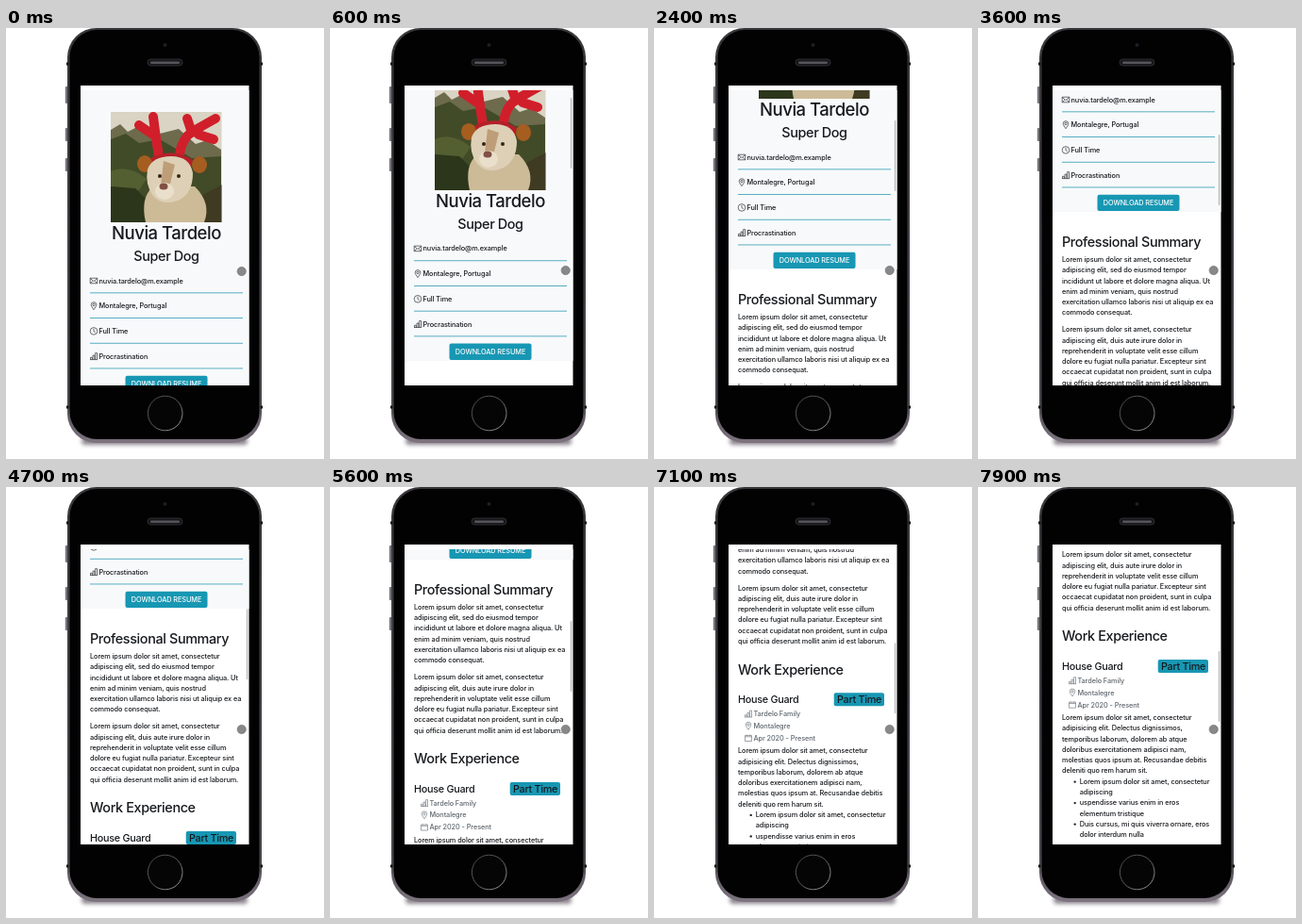
Recreate the animation shown at these times as an HTML page. Size 337 px wide and 457 px high, loop 8000 ms.

```html
<!DOCTYPE html>
<html lang="en">
<head>
<meta charset="utf-8">
<title>Resume on a phone</title>
<style>
  html, body { margin: 0; width: 100%; height: 100%; overflow: hidden; background: #fff; }
  svg { display: block; }
  text { font-family: Inter, sans-serif; font-size: 7.3px; font-weight: 450; letter-spacing: -.01em; fill: #16191d; }
  .h1, .h2, .h3 { font-weight: 530; letter-spacing: -.026em; }
  .h1 { font-size: 18.5px; }
  .h2 { font-size: 14.4px; }
  .h3 { font-size: 10.8px; }
  .muted { fill: #5f676f; font-weight: 500; }
  .mid { text-anchor: middle; }
  .light { fill: #fff; }
  .icon { fill: none; stroke: #212529; stroke-width: .65; }
  .icon.muted { stroke: #6c757d; }
</style>
</head>
<body>
<svg width="337" height="457" viewBox="0 0 337 457">
  <defs>
    <linearGradient id="rim" x2="0" y2="1">
      <stop offset="0" stop-color="#39363b"/>
      <stop offset=".9" stop-color="#4d484f"/>
      <stop offset="1" stop-color="#7d7480"/>
    </linearGradient>
    <linearGradient id="ring" x2="1" y2="1">
      <stop offset="0" stop-color="#4a4a4a"/>
      <stop offset=".5" stop-color="#5a5a5a"/>
      <stop offset="1" stop-color="#a5a5a5"/>
    </linearGradient>
    <filter id="soft" x="-10%" y="-100%" width="120%" height="300%"><feGaussianBlur stdDeviation="2"/></filter>
    <clipPath id="view"><rect x="79" y="66" width="178.500" height="313"/></clipPath>
    <clipPath id="photo"><rect x="111" y="89" width="117.500" height="117"/></clipPath>
  </defs>

  <!-- phone -->
  <rect x="80" y="434" width="176" height="8" rx="4" fill="#8d858e" filter="url(#soft)"/>
  <g fill="#77747a">
    <rect x="62.800" y="62" width="2.500" height="18" rx="1"/>
    <rect x="62.800" y="106" width="2.500" height="14" rx="1"/>
    <rect x="62.800" y="138" width="2.500" height="14" rx="1"/>
  </g>
  <rect x="65" y="0" width="206" height="440" rx="31" fill="url(#rim)"/>
  <rect x="67.500" y="2" width="201" height="434" rx="29" fill="#020202"/>
  <path d="M64 38h2.500M64 402h2.500M269.500 38h2.500M269.500 402h2.500" stroke="#111" stroke-width="3"/>
  <circle cx="168.500" cy="18" r="2" fill="#1d1e25"/>
  <rect x="150" y="33" width="37" height="7" rx="3.500" fill="#17171a" stroke="#3b3b3f" stroke-width=".7"/>
  <rect x="153" y="35.500" width="31" height="2.500" rx="1.200" fill="#55555a"/>
  <circle cx="168.700" cy="408.500" r="18.300" fill="#050505" stroke="url(#ring)"/>

  <!-- screen -->
  <rect x="79" y="61" width="178.500" height="318" fill="#fff"/>
  <g clip-path="url(#view)">
    <g id="page">
      <rect x="79" y="0" width="179" height="387" fill="#f8f9fa"/>
      <g clip-path="url(#photo)">
        <rect x="111" y="89" width="118" height="117" fill="#d9d4c3"/>
        <path d="M111 108l10-6 8 8 14-7 16 10 24-6 18 16 12-4 15 10v78H111z" fill="#6d6b4c"/>
        <path d="M111 118l16-6 14 10 22-4 34 20 31-2v70H111z" fill="#414b27"/>
        <path d="M111 152q18-8 38 8l-8 12-30-4z" fill="#535f30"/>
        <path d="M111 168l26 2 12 12 3 24h-41z" fill="#2c361b"/>
        <path d="M203 180l26-14v40h-32z" fill="#3f3a22"/>
        <path d="M148 206q-6-26 8-38h44q18 18 10 38z" fill="#cdbb98"/>
        <g fill="none" stroke="#d01f2b" stroke-width="10" stroke-linecap="round" stroke-linejoin="round">
          <path d="M162 136q-3-18-6-42M157 114l-16-11"/>
          <path d="M184 134q2-16 13-24l25-14M197 111l-5-15M204 113l16 5"/>
        </g>
        <path d="M153 138q24-12 45 2l-2 9h-42z" fill="#b51f28"/>
        <ellipse cx="147" cy="144" rx="8" ry="9" fill="#a65d20"/>
        <ellipse cx="205" cy="145" rx="8" ry="9" fill="#a65d20"/>
        <path d="M150 150q5-14 25-14 20 0 23 18 0 22-16 29-16 6-26-5-9-12-6-28z" fill="#ddd0b6"/>
        <path d="M167 141l12 4-5 20-10 2z" fill="#bd9e78"/>
        <ellipse cx="168" cy="173" rx="10" ry="9" fill="#e9dfcb"/>
        <circle cx="163" cy="157" r="2" fill="#32241b"/>
        <circle cx="183" cy="157" r="2" fill="#32241b"/>
        <ellipse cx="167" cy="168" rx="4.500" ry="3.500" fill="#825044"/>
      </g>
    </g>
  </g>
  <rect id="bar" x="254.800" y="66" width="1.500" height="75" rx=".75" fill="#bdbdbd"/>
  <circle id="dot" cx="249.700" cy="257" r="4.600" fill="#88888a" stroke="#737376" stroke-width=".7"/>
</svg>
<script>
const NS = 'http://www.w3.org/2000/svg';
const $ = id => document.getElementById(id);
const page = $('page'), bar = $('bar'), dot = $('dot');
const TEAL = '#1797b3', LEADING = 11.25;

function add(tag, attrs, content = '') {
  const el = document.createElementNS(NS, tag);
  for (const key in attrs) el.setAttribute(key, attrs[key]);
  el.textContent = content;
  page.append(el);
}
const write = (x, y, content, cls = '') => add('text', { x, y, class: cls }, content);
const lines = (x, y, list) => list.forEach((s, i) => write(x, y + i * LEADING, s));

// Icons are drawn around their own centre.
const icons = {
  mail: 'M-3.800-2.800h7.600v5.600h-7.600zM-3.800-2.500L0 .5 3.800-2.500M-3.600 2.600l2.500-2.300M3.600 2.600L1.100.3',
  pin: 'M0 4C-1.200 2-2.800.3-2.800-1.200a2.800 2.800 0 0 1 5.600 0C2.800.3 1.200 2 0 4zM-1.200-1.200a1.200 1.200 0 0 0 2.400 0a1.200 1.200 0 0 0-2.400 0',
  clock: 'M-3.800 0a3.800 3.800 0 0 0 7.600 0a3.800 3.800 0 0 0-7.600 0M0-2.500V.3l1.700 1',
  bars: 'M-3.500 3.500v-2.300h1.800v2.300M-1 3.500v-4.500h1.900v4.500M1.600 3.500v-7h1.900v7M-4 3.500h8',
  date: 'M-3.500-2.800h7v6h-7zM-3.500-1.500h7M-1.800-3.800v1M1.800-3.800v1'
};
function row(icon, x, y, content, gap, cls = '') {
  add('path', { d: icons[icon], class: 'icon ' + cls, transform: `translate(${x} ${y})` });
  write(x + gap, y + 2.5, content, cls);
}

write(170, 224, 'Nuvia Tardelo', 'h1 mid');
write(170, 247, 'Super Dog', 'h2 mid');
[
  ['mail', 'nuvia.tardelo@m.example'],
  ['pin', 'Montalegre, Portugal'],
  ['clock', 'Full Time'],
  ['bars', 'Procrastination']
].forEach(([icon, label], i) => {
  const y = 268 + i * 26.7;
  row(icon, 93, y, label, 5.5);
  add('rect', { x: 89, y: y + 12.4, width: 162, height: .9, fill: '#46a6bd' });
});
add('rect', { x: 126.5, y: 368.7, width: 87, height: 17.3, rx: 2, fill: TEAL });
write(170, 380.1, 'DOWNLOAD RESUME', 'mid light');

write(89, 423.7, 'Professional Summary', 'h2');
lines(89, 440, [
  'Lorem ipsum dolor sit amet, consectetur',
  'adipiscing elit, sed do eiusmod tempor',
  'incididunt ut labore et dolore magna aliqua. Ut',
  'enim ad minim veniam, quis nostrud',
  'exercitation ullamco laboris nisi ut aliquip ex ea',
  'commodo consequat.'
]);
lines(89, 514.4, [
  'Lorem ipsum dolor sit amet, consectetur',
  'adipiscing elit, duis aute irure dolor in',
  'reprehenderit in voluptate velit esse cillum',
  'dolore eu fugiat nulla pariatur. Excepteur sint',
  'occaecat cupidatat non proident, sunt in culpa',
  'qui officia deserunt mollit anim id est laborum.'
]);

write(89, 603.3, 'Work Experience', 'h2');
write(89, 634, 'House Guard', 'h3');
add('rect', { x: 190.7, y: 623, width: 53.3, height: 14, rx: 2, fill: TEAL });
write(217.5, 634, 'Part Time', 'h3 mid');
row('bars', 100, 645.2, 'Tardelo Family', 5.4, 'muted');
row('pin', 100, 658, 'Montalegre', 5.4, 'muted');
row('date', 100, 671, 'Apr 2020 - Present', 5.4, 'muted');
lines(89, 687, [
  'Lorem ipsum dolor sit amet, consectetur',
  'adipisicing elit. Delectus dignissimos,',
  'temporibus laborum, dolorem ab atque',
  'doloribus exercitationem adipisci nam,',
  'molestias quos ipsum at. Recusandae debitis',
  'deleniti quo rem harum sit.'
]);
lines(107.8, 754.8, [
  'Lorem ipsum dolor sit amet, consectetur',
  'adipiscing',
  'uspendisse varius enim in eros',
  'elementum tristique',
  'Duis cursus, mi quis viverra ornare, eros',
  'dolor interdum nulla'
]);
for (let i = 0; i < 3; i++) {
  add('circle', { cx: 102.7, cy: 752.6 + i * 2 * LEADING, r: 1.2, fill: '#212529' });
}

// [time, scroll offset]; equal neighbours are short rests.
const path = [
  [0, 0], [1100, 62.5], [2400, 131], [2700, 147.5], [2800, 147.5], [3600, 192],
  [4700, 258], [5200, 290.5], [5300, 290.5], [6500, 369], [7500, 428.5], [7700, 428.5], [7900, 440]
];
function scrollAt(t) {
  const i = path.findIndex(([time]) => time > t);
  if (i < 0) return path[path.length - 1][1];
  const [t0, y0] = path[i - 1], [t1, y1] = path[i];
  return y0 + (y1 - y0) * (t - t0) / (t1 - t0);
}

function draw() {
  const t = Math.floor(performance.now() % 8000 / 100) * 100;
  const y = scrollAt(t);
  page.setAttribute('transform', `translate(0 ${-y})`);
  bar.setAttribute('y', 65.7 + y * 0.246);
  bar.setAttribute('opacity', t ? 1 : 0);
  dot.setAttribute('cy', t ? 257 : 258);
  requestAnimationFrame(draw);
}
draw();
</script>
</body>
</html>
```
